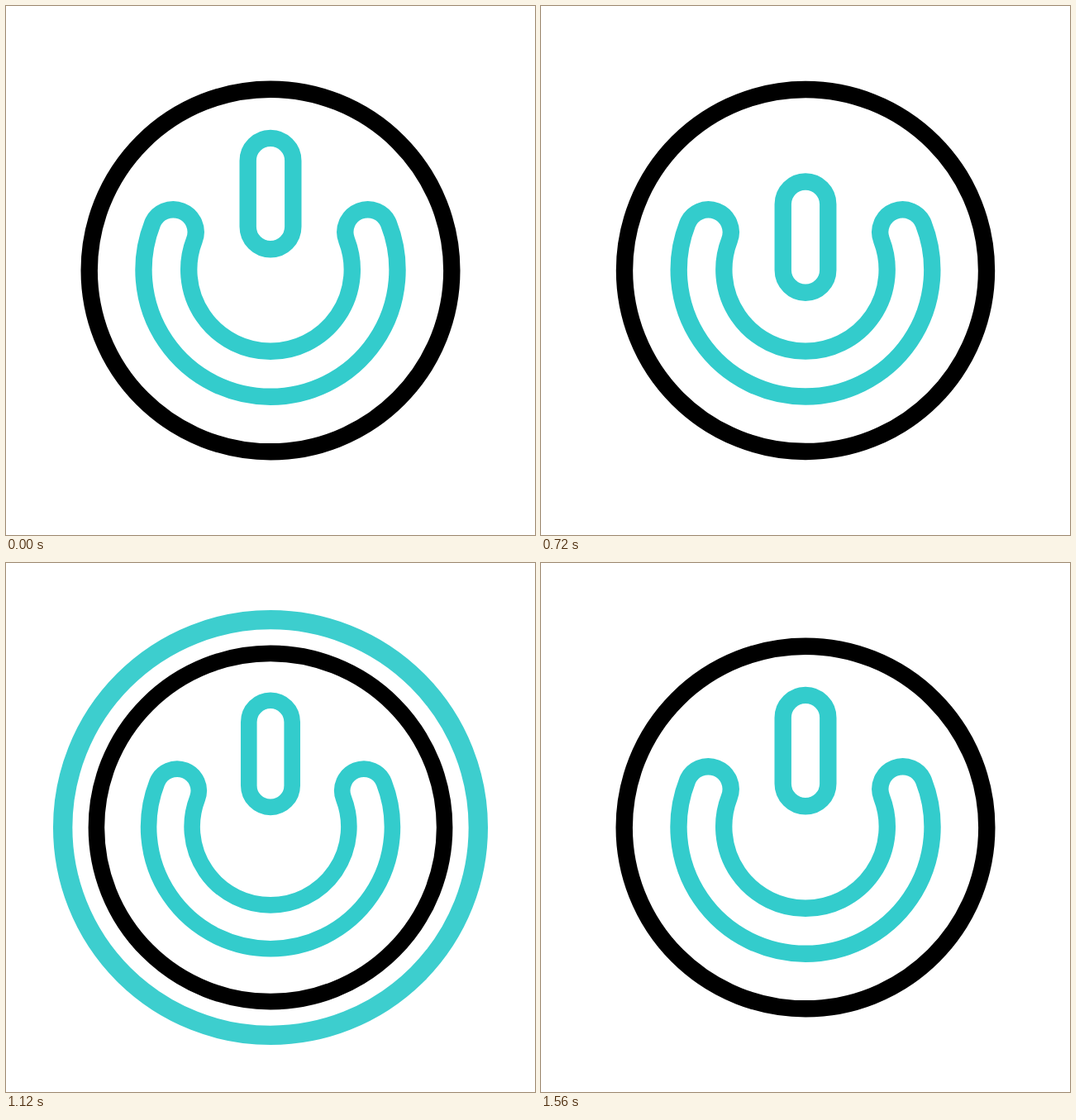
An HTML page that plays this animation: 640x640 px, repeating every 2420 ms.

```html
<!DOCTYPE html>
<html>
<head>
<meta charset="utf-8">
<title>Power button</title>
<style>
html, body { margin: 0; width: 100%; height: 100%; overflow: hidden; background: #fff; }
svg { display: block; width: 100%; height: 100%; fill: none; stroke: #3cc; stroke-width: 20.4; }
</style>
</head>
<body>
<svg viewBox="-320 -320 640 640">
  <circle id="wave" r="219.3"/>
  <g id="button">
    <circle r="219.3" stroke="#000"/>
    <path transform="translate(0 -.7)" d="M-142.9-56.1A27.3 27.3 0 0 1-92.1-36.1A98.8 98.8 0 1 0 92.1-36.1A27.3 27.3 0 0 1 142.9-56.1A153.5 153.5 0 1 1-142.9-56.1Z"/>
    <rect id="bar" x="-27.3" y="-160.1" width="54.6" height="134.4" rx="27.3"/>
  </g>
</svg>
<script>
const STEP = 20, LOOP = 2420;
const [wave, button, bar] = ['wave', 'button', 'bar'].map(id => document.getElementById(id));
const clamp = v => Math.min(1, Math.max(0, v));
const span = (n, from, to) => clamp((n - from) / (to - from));

// Cubic Bezier easing with control points (x1, 0) and (x2, 1).
function ease(u, x1, x2) {
  let lo = 0, hi = 1, t;
  if (u <= 0 || u >= 1) return u;
  for (let i = 0; i < 30; i++) {
    t = (lo + hi) / 2;
    const x = 3 * x1 * t * (1 - t) ** 2 + 3 * x2 * t * t * (1 - t) + t ** 3;
    if (x < u) lo = t; else hi = t;
  }
  return t * t * (3 - 2 * t);
}

function draw(now) {
  const n = Math.floor(now % LOOP / STEP);

  const drop = 54 * (ease(span(n, 0, 28), .167, .136) - ease(span(n, 35, 57), .167, .136));
  bar.setAttribute('transform', `translate(0 ${drop})`);

  const press = .09 * (ease(span(n, 35, 49), .33, .67) - ease(span(n, 49, 78), .14, .09));
  button.setAttribute('transform', `scale(${1 - press})`);

  const spread = 1.207 - .00032 * Math.max(0, 69.8 - n) ** 2;
  wave.setAttribute('transform', `scale(${spread})`);
  wave.setAttribute('opacity', span(n, 49, 55) - span(n, 55, 75));
}

const start = performance.now();
function tick() {
  draw(performance.now() - start);
  requestAnimationFrame(tick);
}
tick();
</script>
</body>
</html>
```
